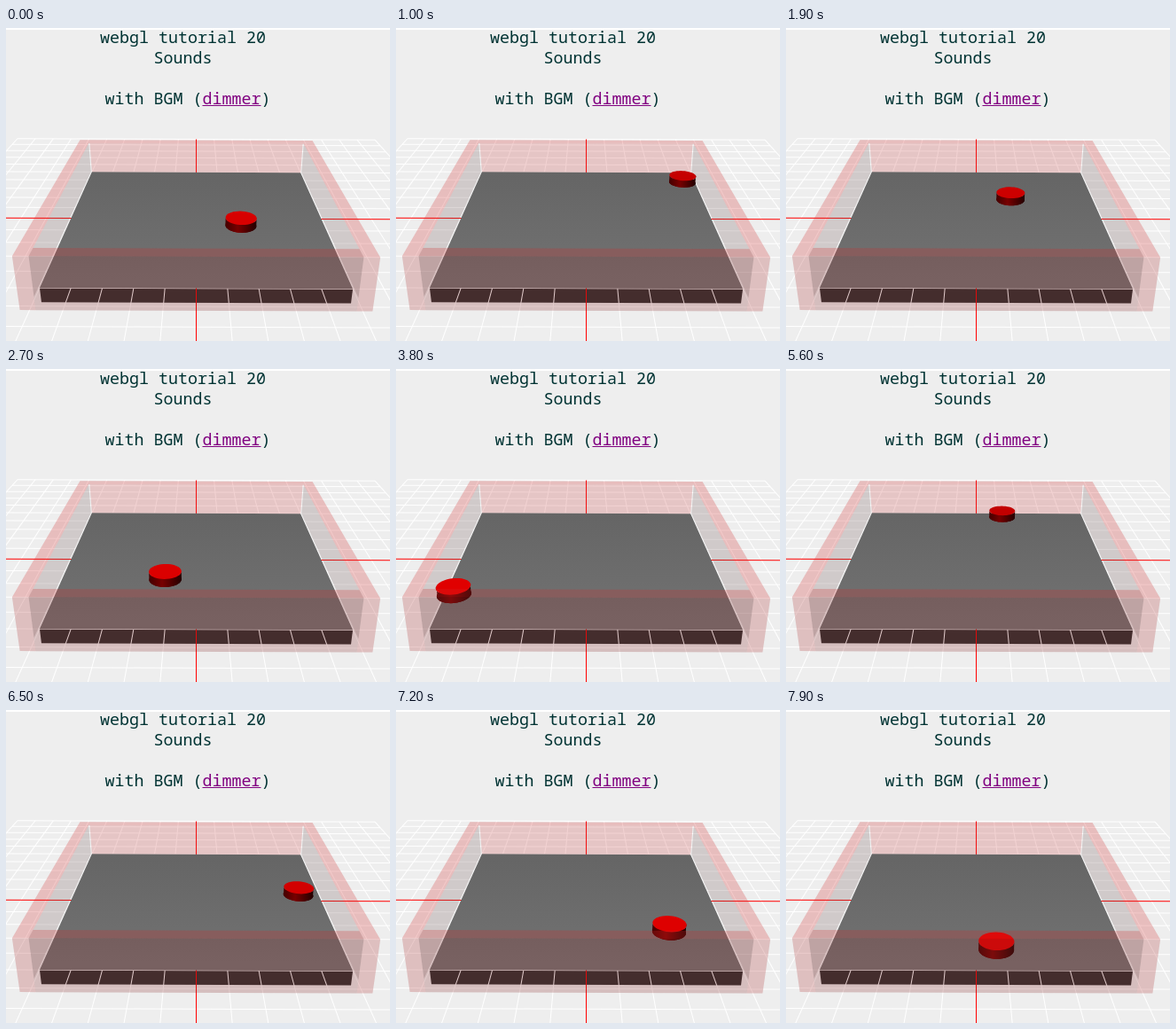
An HTML page with a canvas that plays this animation: 433x353 px, repeating every 8000 ms.

```html
<!DOCTYPE html>
<html lang="en">
<head>
<meta charset="utf-8">
<title>Sounds</title>
<style>
html, body { margin: 0; width: 100%; height: 100%; overflow: hidden; background: #eee; }
canvas { position: absolute; left: 0; top: 0; }
pre {
  position: absolute; left: 0; top: -2px; width: 399px; margin: 0;
  font: 18.33px/23px "Noto Sans Mono", "DejaVu Sans Mono", monospace;
  text-align: center; color: #033;
}
u { color: #800080; text-decoration-thickness: 1px; text-underline-offset: 1px; }
</style>
</head>
<body>
<canvas id="stage" width="433" height="353"></canvas>
<pre>webgl tutorial 20
Sounds

 with BGM (<u>dimmer</u>)</pre>
<script>
const ctx = document.getElementById('stage').getContext('2d');
const FOCAL = 648, SIN = 0.391, COS = 0.92;
const HALF = 5, OUTER = 5.5, TOP = 1.45, BASE = -0.5;
const SIDE_IN = 5.05, SIDE_OUT = 5.55;
const RADIUS = 0.6, LIFT = 0.04, THICK = 0.37, LIMIT = 4.7;

// Pitched camera: x right, y up, z towards the viewer
function project([x, y, z]) {
  const depth = 22.95 - z * COS - y * SIN;
  const rise = -1.342 + y * COS - z * SIN;
  return [214.5 + FOCAL * x / depth, 176.5 - FOCAL * rise / depth];
}

function trace(points) {
  ctx.beginPath();
  for (const p of points) ctx.lineTo(...project(p));
}

function poly(points, fill) {
  trace(points);
  ctx.fillStyle = fill;
  ctx.fill();
}

function line(a, b, color) {
  trace([a, b]);
  ctx.strokeStyle = color;
  ctx.stroke();
}

const flat = (x0, x1, z0, z1, y, fill) =>
  poly([[x0, y, z0], [x1, y, z0], [x1, y, z1], [x0, y, z1]], fill);

const upright = (x0, x1, y0, y1, z, fill) =>
  poly([[x0, y0, z], [x1, y0, z], [x1, y1, z], [x0, y1, z]], fill);

function drawGrid() {
  ctx.lineWidth = 1;
  for (let i = -10; i <= 10; i++) {
    if (!i) continue;
    line([i, 0, -10], [i, 0, 10], '#fff');
    line([-10, 0, i], [10, 0, i], '#fff');
  }
  line([-10, 0, 0], [10, 0, 0], '#f00');
  line([0, 0, -10], [0, 0, 10], '#f00');
}

function drawBoard() {
  upright(-HALF, HALF, -0.55, 0, HALF, '#2d2d2d');
  drawGrid();
  const shade = ctx.createLinearGradient(0, 162, 0, 293);
  shade.addColorStop(0, '#656565');
  shade.addColorStop(1, '#737373');
  flat(-HALF, HALF, -HALF, HALF, 0, shade);
}

function drawInnerWalls() {
  for (const x of [-SIDE_IN, SIDE_IN])
    poly([[x, 0, -HALF], [x, TOP, -HALF], [x, TOP, OUTER], [x, 0, OUTER]], 'rgba(115,92,92,.25)');
  upright(-HALF, HALF, 0, TOP, -HALF, 'rgba(200,60,60,.23)');
}

function drawOuterWalls() {
  const top = 'rgba(205,40,40,.25)', front = 'rgba(135,45,45,.25)', end = 'rgba(170,50,50,.25)';
  flat(-SIDE_OUT, -SIDE_IN, -OUTER, OUTER, TOP, top);
  flat(SIDE_IN, SIDE_OUT, -OUTER, OUTER, TOP, top);
  flat(-SIDE_IN, SIDE_IN, -OUTER, -HALF, TOP, top);
  flat(-SIDE_IN, SIDE_IN, HALF, OUTER, TOP, top);
  upright(-SIDE_OUT, -SIDE_IN, BASE, TOP, OUTER, end);
  upright(-SIDE_IN, SIDE_IN, BASE, TOP, OUTER, front);
  upright(SIDE_IN, SIDE_OUT, BASE, TOP, OUTER, end);
}

// Straight travel folded back and forth between the walls
function bounce(s) {
  const span = 4 * LIMIT;
  const m = (((s + LIMIT) % span) + span) % span;
  return LIMIT - Math.abs(m - 2 * LIMIT);
}

function drawPuck(t) {
  const cx = bounce(1.735 + 3.264 * t);
  const cz = bounce(0.66 - 4.364 * t);
  const ring = (y, from, to) => Array.from({ length: 41 }, (_, i) => {
    const a = from + (to - from) * i / 40;
    return [cx + RADIUS * Math.cos(a), y, cz + RADIUS * Math.sin(a)];
  });
  const side = ctx.createLinearGradient(
    project([cx - RADIUS, 0, cz])[0], 0, project([cx + RADIUS, 0, cz])[0], 0);
  side.addColorStop(0, '#440000');
  side.addColorStop(0.4, '#780000');
  side.addColorStop(1, '#240000');
  poly(ring(LIFT, 0, 2 * Math.PI), side);
  poly([...ring(LIFT, 0, Math.PI), ...ring(THICK, Math.PI, 0)], side);
  poly(ring(THICK, 0, 2 * Math.PI), `rgb(${212 + 4 * cz},0,0)`);
}

function frame(now) {
  // The picture advances ten times a second
  const t = Math.floor(now % 8000 / 100) / 10;
  ctx.setTransform(1, 0, 0, 1, 0, 0);
  ctx.fillStyle = '#eee';
  ctx.fillRect(0, 0, 433, 353);
  ctx.fillStyle = '#fff';
  ctx.fillRect(0, 0, 433, 2);
  ctx.setTransform(1, 0.0035, 0, 1, 0, -0.05); // slight camera roll
  drawBoard();
  drawInnerWalls();
  drawPuck(t);
  drawOuterWalls();
  requestAnimationFrame(frame);
}
requestAnimationFrame(frame);
</script>
</body>
</html>
```
